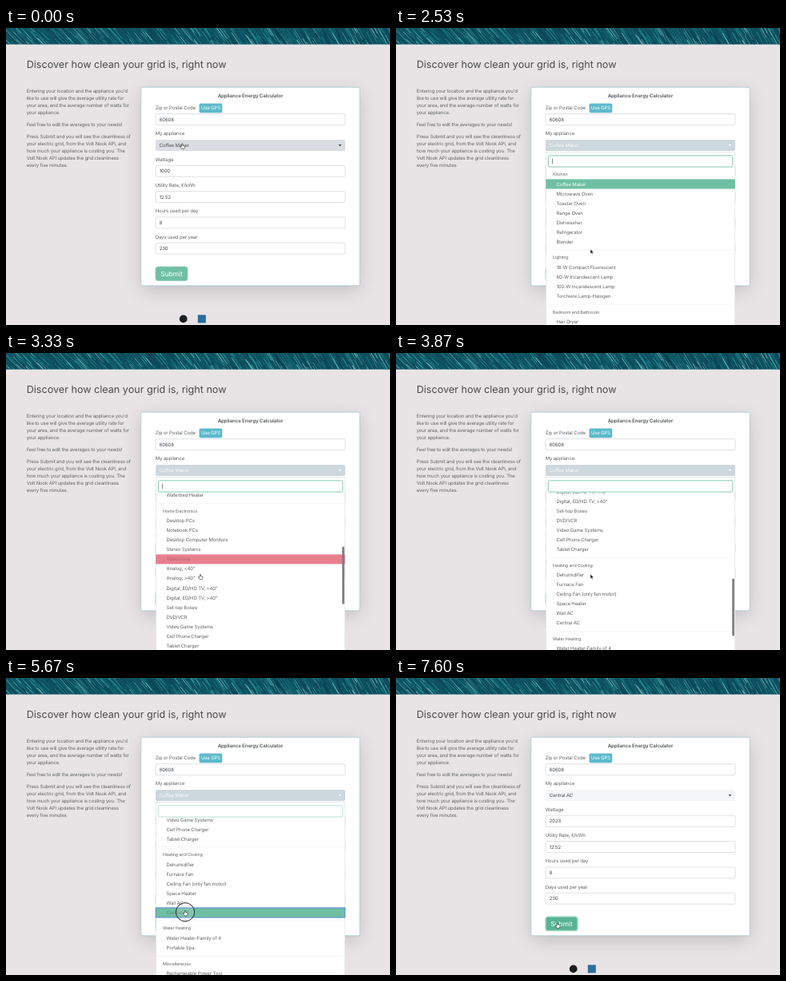
These frames come from a looping animation (480x372 px, 8 s). An HTML page:

```html
<!DOCTYPE html>
<html lang="en">
<head>
<meta charset="utf-8">
<title>Appliance Energy Calculator</title>
<style>
  html, body { margin: 0; width: 100%; height: 100%; overflow: hidden; background: #e8e4e5; }
  #stage { display: block; position: relative; width: 480px; height: 372px; }
  .shadow {
    position: absolute; left: 170px; top: 75px; width: 271px; height: 247px;
    border-radius: 2px; box-shadow: 0 6px 22px rgba(40, 30, 40, .2);
  }
  svg { position: absolute; left: 0; top: 0; overflow: hidden; }
  text {
    font: 6px Inter, "Open Sans", sans-serif; letter-spacing: -.02em;
    fill: #606265; text-rendering: geometricPrecision;
  }
  .h1 { font-size: 12.6px; letter-spacing: 0; fill: #4a4a4c; }
  .title { font-size: 6.2px; font-weight: 600; text-anchor: middle; fill: #55585b; }
  .value { fill: #42464b; }
  .white { fill: #fff; }
  .group { font-size: 5.4px; }
  .input { fill: #fff; stroke: #d6dade; stroke-width: .8; }
</style>
</head>
<body>
<div id="stage">
  <div class="shadow"></div>
  <svg width="480" height="372" viewBox="0 0 480 372">
    <svg id="banner" width="480" height="20.5"><rect width="480" height="21" fill="#0e5060"/></svg>
    <text class="h1" x="25.7" y="50">Discover how clean your grid is, right now</text>
    <g id="copy"></g>
    <circle cx="221.7" cy="364.4" r="4.9" fill="#1b1d20"/>
    <rect x="239.8" y="359.4" width="10" height="10" fill="#2a6d9f"/>

    <rect x="168.8" y="74.2" width="273.4" height="248.6" rx="2.2" fill="#fff" stroke="#a6cdd0" stroke-width=".8"/>
    <text class="title" x="305.5" y="87.1">Appliance Energy Calculator</text>
    <g id="form"></g>
    <rect x="241.5" y="94.4" width="28.8" height="11.8" rx="1.8" fill="#5cbacb"/>
    <text class="white" x="256" y="102.4" text-anchor="middle">Use GPS</text>
    <rect id="select" x="187" y="140" width="237" height="14" rx="1.8"/>
    <text id="choice" x="191.7" y="149.1"></text>
    <path id="caretDown" d="M415.6 146h3.8l-1.9 2z"/>
    <rect id="submit" x="187" y="299" width="40" height="17.6" rx="3.4"/>
    <text class="white" x="207" y="310.8" text-anchor="middle" style="font-size:8.4px;letter-spacing:0">Submit</text>

    <g id="menu">
      <rect x="187.4" y="155.3" width="236.4" height="230" fill="#fff" stroke="#d9dcde" stroke-width=".6"/>
      <svg y="175" width="480" height="197" viewBox="0 175 480 197">
        <g id="list"></g>
      </svg>
      <rect id="thumb" x="420.2" width="2.7" height="72" rx="1.3" fill="#7d7d7f"/>
      <rect id="search" x="190.3" y="159.8" width="230.6" height="14.2" rx="1.8" fill="#fff"/>
      <rect id="caret" x="195.2" y="163.6" width=".7" height="6.6" fill="#555"/>
    </g>

    <circle id="ring" r="11.6" fill="#fff" fill-opacity=".12" stroke="#23282b" stroke-width="1"/>
    <g id="cursor" stroke-linejoin="round">
      <path id="arrow" d="M0 0v6.2l1.5-1.3 1 2.2 1-.4-1-2.2h2z" fill="#111" stroke="#fff" stroke-width=".5"/>
      <path id="hand" d="M-.6 .4q.6-.8 1.2 0v2.3l2.2.5q.7.2.6 1l-.5 2q-.2 1-1 1.2h-2.2q-.6-.1-1-.8l-1.6-2.2q-.2-.9.7-.8l1 .8z" fill="#fff" stroke="#222" stroke-width=".65"/>
      <path id="beam" d="M-1.6 -3q1.3 0 1.6.6q.3-.6 1.6-.6M0-2.4v4.8M-1.6 3q1.3 0 1.6-.6q.3.6 1.6.6M-.8 .9h1.6" fill="none" stroke="#222" stroke-width=".8"/>
    </g>
  </svg>
</div>
<script>
const LOOP = 8000, OPEN = 200, CLOSE = 5800, PRESS = 5600, SUBMIT = 7070;
const $ = id => document.getElementById(id);

function add(parent, tag, attrs, label) {
  const el = document.createElementNS('http://www.w3.org/2000/svg', tag);
  for (const k in attrs) el.setAttribute(k, attrs[k]);
  if (label) el.textContent = label;
  return parent.appendChild(el);
}
function set(id, attrs) {
  for (const k in attrs) $(id).setAttribute(k, attrs[k]);
}
const show = (id, on) => set(id, { visibility: on ? 'inherit' : 'hidden' });

// Light streaks in the banner, steeper towards the right
let seed = 11;
const rnd = () => (seed = seed * 16807 % 2147483647) / 2147483647;
const tints = ['#0a3345', '#0c3f50', '#17757f', '#1f9097', '#2ba3a6', '#8fd6d2'];
for (let i = 0; i < 650; i++) {
  const x = rnd() * 510 - 25, y = rnd() * 30 - 12, len = 8 + rnd() * 20;
  const a = .75 + x / 480 * .3 + rnd() * .06;
  add($('banner'), 'line', {
    x1: x, y1: y, x2: x + len * Math.cos(a), y2: y + len * Math.sin(a),
    stroke: tints[Math.floor(rnd() * tints.length)],
    'stroke-width': .4 + rnd() * .6, opacity: .5 + rnd() * .5
  });
}

// Intro copy
const paragraphs = [
  [79, "Entering your location and the appliance you'd", 'like to use will give the average utility rate for',
    'your area, and the average number of watts for', 'your appliance.'],
  [121, 'Feel free to edit the averages to your needs!'],
  [136, 'Press Submit and you will see the cleanliness of', 'your electric grid, from the Volt Nook API, and',
    'how much your appliance is costing you. The', 'Volt Nook API updates the grid cleanliness', 'every five minutes.']
];
for (const [top, ...lines] of paragraphs)
  lines.forEach((s, i) => add($('copy'), 'text', { x: 25.7, y: top + 1.9 + i * 9 }, s));

// Form fields
const fields = [['Zip or Postal Code', '60608'], ['My appliance'], ['Wattage', '1000'],
  ['Utility Rate, ¢/kWh', '12.52'], ['Hours used per day', '8'], ['Days used per year', '230']];
const values = fields.map(([label, value], i) => {
  const y = 100.2 + i * 32.32;
  add($('form'), 'text', { x: 186.7, y: y + 1.9 }, label);
  if (!value) return null;
  add($('form'), 'rect', { class: 'input', x: 187, y: y + 7.4, width: 237, height: 14, rx: 1.8 });
  return add($('form'), 'text', { class: 'value', x: 191.7, y: y + 16.6 }, value);
});

// Appliance list
const groups = {
  'Kitchen': 'Coffee Maker|Microwave Oven|Toaster Oven|Range Oven|Dishwasher|Refrigerator|Blender',
  'Lighting': '18-W Compact Fluorescent|60-W Incandescent Lamp|100-W Incandescent Lamp|Torchiere Lamp-Halogen',
  'Bedroom and Bathroom': 'Hair Dryer|Waterbed Heater',
  'Home Electronics': 'Desktop PCs|Notebook PCs|Desktop Computer Monitors|Stereo Systems|Televisions|Analog, <40"|' +
    'Analog, >40"|Digital, ED/HD TV, <40"|Digital, ED/HD TV, >40"|Set-top Boxes|DVD/VCR|Video Game Systems|' +
    'Cell Phone Charger|Tablet Charger',
  'Heating and Cooling': 'Dehumidifier|Furnace Fan|Ceiling Fan (only fan motor)|Space Heater|Wall AC|Central AC',
  'Water Heating': 'Water Heater-Family of 4|Portable Spa',
  'Miscellaneous': 'Rechargeable Power Tool'
};
const rows = [];
let y = 183;
for (const name in groups) {
  if (rows.length) add($('list'), 'rect', { x: 187.6, y: y - 9.8, width: 236, height: .5, fill: '#eceeef' });
  add($('list'), 'text', { class: 'group', x: 196, y: y + 1.9 }, name);
  y += 12.4;
  for (const label of groups[name].split('|')) {
    const bar = add($('list'), 'rect', { x: 187.2, y: y - 6, width: 236.6, height: 12.05 });
    const text = add($('list'), 'text', { x: 200.5, y: y + 2.1 }, label);
    rows.push({ y, bar, text, label });
    y += 12.05;
  }
  y += 7.65;
}

// Tracks: [time, values...]
const pointer = [[0, 220.3, 144.7], [730, 220.3, 144.7], [1000, 221, 164], [1600, 221, 164], [1730, 225, 190],
  [1870, 225, 191], [2200, 240, 268], [2330, 243, 277], [4270, 243, 277], [4400, 235.5, 265],
  [5000, 226, 285], [5330, 224, 291], [6470, 224, 291], [6930, 202, 306.5], [8000, 202, 306.5]];
const scroll = [[0, 0], [2530, 0], [2700, 20], [3330, 202.1], [3600, 277], [3900, 328], [4400, 365.1],
  [5000, 367.3], [8000, 367.3]];

function at(track, t) {
  let i = 1;
  while (i < track.length - 1 && track[i][0] <= t) i++;
  const [a, b] = [track[i - 1], track[i]];
  const p = Math.max(0, (t - a[0]) / (b[0] - a[0]));
  return a.slice(1).map((v, k) => v + (b[k + 1] - v) * p);
}
const clamp = v => Math.max(0, Math.min(1, v));

function paintRow(row, state) {
  const [fill, color, edge] = {
    plain: ['none', '#606265', 'none'],
    chosen: ['#6fbfa2', '#fff', 'none'],
    hover: ['#e87f8f', '#b5606f', 'none'],
    pressed: ['#6fbfa2', '#5d8a7c', '#5384d6']
  }[state];
  row.bar.setAttribute('fill', fill);
  row.bar.setAttribute('stroke', edge);
  row.text.style.fill = color;
}

function draw(t) {
  const open = t >= OPEN && t < CLOSE, done = t >= CLOSE, pressing = t >= PRESS;
  const [x, py] = at(pointer, t), [s] = at(scroll, t), [late] = at(scroll, t - 70);

  // Hover follows the scroll one step late
  const hot = open && py > 175 ? rows.find(r => Math.abs(r.y - late - py) <= 6.03) : null;
  const overSearch = open && py > 159 && py <= 175;
  const overSubmit = !open && py > 299;

  show('menu', open);
  if (open) {
    rows.forEach((r, i) => paintRow(r,
      r === hot && pressing ? 'pressed' : i === 0 && !pressing ? 'chosen' : r === hot ? 'hover' : 'plain'));
    set('list', { transform: `translate(0 ${-s})` });
    set('thumb', { y: 175.7 + s / 3.02, opacity: clamp((t - 2540) / 130) * clamp((5330 - t) / 200) });
    set('search', { stroke: pressing ? '#a9d8cb' : '#86c9b4', 'stroke-width': pressing ? .8 : 1 });
    show('caret', !pressing && (t + 670) % 1000 < 500);
  }

  const focus = done ? 1 - clamp((t - SUBMIT) / 200) : 0;
  set('select', {
    fill: open ? '#cdd7de' : !done ? '#dadde3' : focus ? '#e6e9ed' : '#f4f6f8',
    stroke: '#c9d0d6', 'stroke-opacity': focus, 'stroke-width': 1.4
  });
  $('choice').textContent = done ? 'Central AC' : 'Coffee Maker';
  $('choice').style.fill = open ? '#f7f9fa' : '#4c5055';
  set('caretDown', { fill: open ? '#fff' : '#333' });
  values[2].textContent = done ? '2023' : '1000';

  const sent = t >= SUBMIT;
  set('submit', {
    fill: overSubmit ? '#57b393' : '#70bfa4',
    stroke: sent ? '#a5d9c5' : '#8accb5', 'stroke-width': sent ? 1.5 : .8
  });

  show('ring', [70, PRESS, SUBMIT].some(c => t >= c && t < c + 300));
  set('ring', { cx: x, cy: py + 2.2 });
  set('cursor', { transform: `translate(${x} ${py}) scale(.92)` });
  const hand = !!hot || overSubmit || py < 155;
  show('hand', hand);
  show('beam', overSearch);
  show('arrow', !hand && !overSearch);
}

const start = performance.now();
function tick(now) {
  const t = Math.max(0, now - start) % LOOP;
  draw(Math.round(Math.floor((t + 4) * .015) / .15) * 10);
  requestAnimationFrame(tick);
}
draw(0);
requestAnimationFrame(tick);
</script>
</body>
</html>
```
